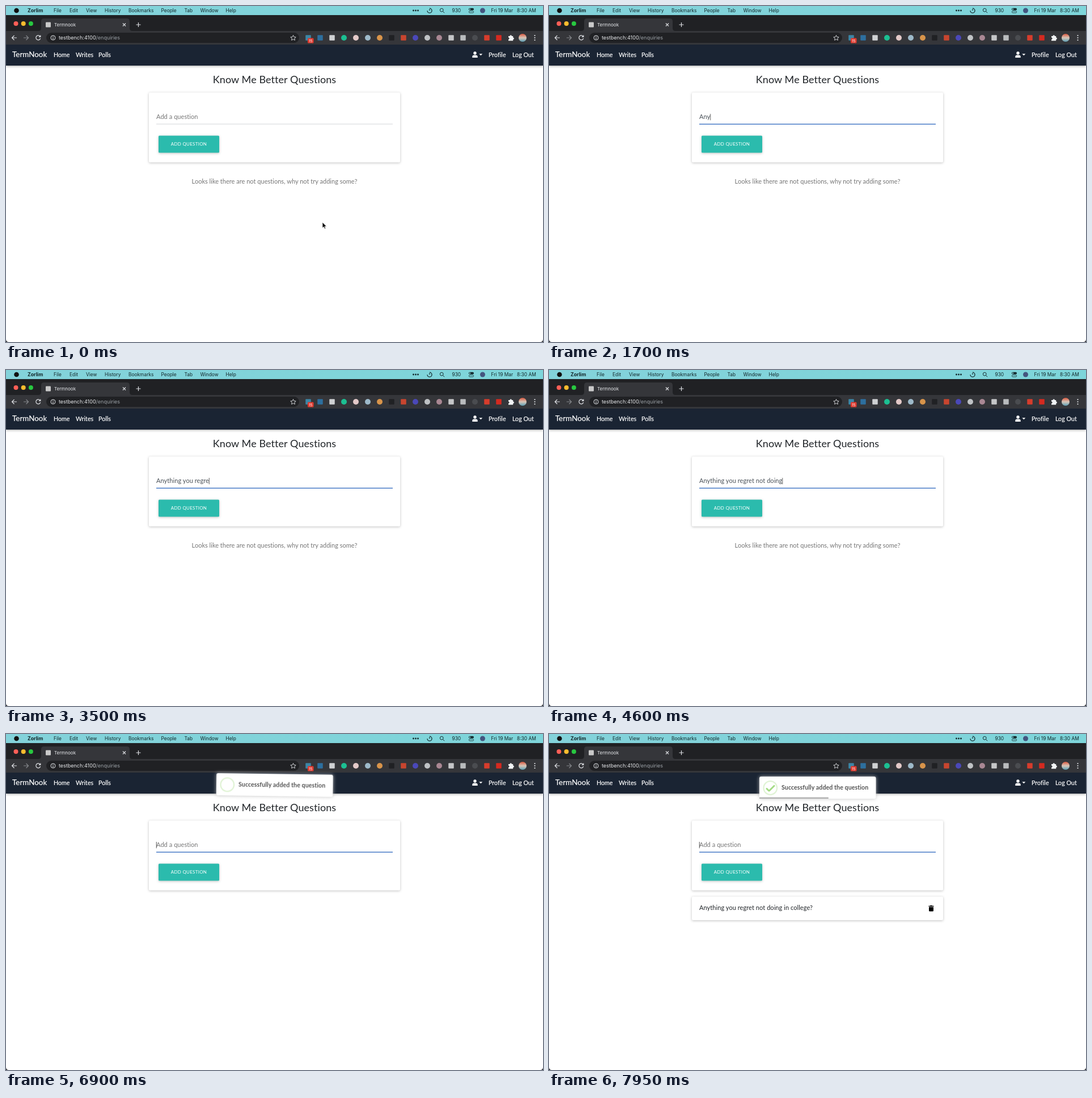
Write an HTML page that moves like this. It is 947 px wide and 592 px high and loops after 8 s.

```html
<!DOCTYPE html>
<html lang="en">
<head>
<meta charset="utf-8">
<title>Question form</title>
<style>
  html, body { margin: 0; height: 100%; overflow: hidden; background: #1c1d20; }
  svg { display: block; width: 100vw; height: 100vh; }
  text { font: 11px Lato, "Open Sans", sans-serif; letter-spacing: .065px; white-space: pre; }
  .ui { font: 8.4px Inter, Roboto, sans-serif; letter-spacing: 0; }
  .nav { font-size: 10.6px; fill: #fff; stroke: #fff; stroke-width: .2; }
  .hint { fill: #757575; }
  .mid { text-anchor: middle; }
  .card { filter: drop-shadow(0 1.3px 2px rgba(0,0,0,.25)); }
  .line { fill: none; stroke: #dfe1e5; stroke-width: 1.2; }
  #toast { transform-origin: 473.5px 94.5px; }
  #item { transform-origin: 473.5px 286px; }
  #bar { transform-origin: 371px 113px; }
  #toast, #item, #typed, #caret, #focus, #ibeam, #spark { opacity: 0; }
</style>
</head>
<body>
<svg viewBox="0 0 947 592" preserveAspectRatio="none">
  <defs>
    <linearGradient id="sky"><stop stop-color="#83d2da"/><stop offset="1" stop-color="#7ed5da"/></linearGradient>
    <linearGradient id="face" x2="0" y2="1"><stop stop-color="#d9583f"/><stop offset=".5" stop-color="#d8c6b8"/><stop offset="1" stop-color="#5b9fb5"/></linearGradient>
    <g id="bin"><path d="M-4.6-4.2h2.4l.7-.9h3l.7.9h2.4v1.3h-9.2zM-4-2.2h8v6.400q0 1.300-1.300 1.300h-5.400q-1.300 0-1.300-1.300z"/></g>
  </defs>

  <!-- page -->
  <path d="M0 68h947v519q0 5-5 5H5q-5 0-5-5z" fill="#fff"/>
  <rect y="68" width="947" height="37" fill="#1a2433" style="filter:drop-shadow(0 1.300px 2px rgba(0,0,0,.35))"/>
  <text class="nav" x="11" y="90.300" style="font-size:13.300px">TermNook</text>
  <g id="links"></g>
  <g fill="#fff"><circle cx="827" cy="83" r="2.700"/><path d="M822.300 91v-1.500q0-3 3-3h3.400q3 0 3 3v1.500zM834.300 84.300h6l-3 3z"/></g>

  <text class="mid" x="473.500" y="136" fill="#212529" style="font-size:18px;letter-spacing:.08px">Know Me Better Questions</text>
  <rect class="card" x="252" y="152.500" width="443" height="123" rx="2" fill="#fff"/>
  <text id="empty" class="hint mid" x="473.500" y="312.800" style="letter-spacing:.02px">Looks like there are not questions, why not try adding some?</text>

  <!-- input -->
  <rect x="265" y="207.500" width="417" height="1" fill="#d3d6da"/>
  <rect id="focus" x="265" y="207.500" width="417" height="1.500" fill="#4f80cc"/>
  <text id="prompt" class="hint" x="265" y="198.700">Add a question</text>
  <g id="typed">
    <text id="entry" x="265" y="198.700" fill="#495057">Anything you regret not doing in college?</text>
    <rect id="cover" x="265" y="188" width="225" height="16" fill="#fff"/>
  </g>
  <g id="caret"><rect x="264.800" y="190" width=".9" height="11.300" fill="#444"/></g>
  <rect class="card" x="269" y="228.500" width="107" height="30" rx="1.500" fill="#2bbbad"/>
  <text class="mid" x="322.500" y="245.500" fill="#fff" style="font-size:8px;letter-spacing:.25px">ADD QUESTION</text>

  <g id="item">
    <rect class="card" x="252" y="286.500" width="443" height="41.500" rx="2" fill="#fff"/>
    <text x="265" y="310.200" fill="#212529">Anything you regret not doing in college?</text>
    <use href="#bin" x="674" y="307"/>
  </g>

  <!-- browser frame -->
  <rect width="947" height="16" fill="url(#sky)"/>
  <path d="M0 68V21q0-5 5-5h937q5 0 5 5v47z" fill="#202124"/>
  <path d="M0 44h57q5 0 5-5V27q0-5 5-5h146q5 0 5 5v12q0 5 5 5h724v24H0z" fill="#35363a"/>
  <rect x="71" y="47" width="446" height="18" rx="9" fill="#202124"/>
  <g id="marks"></g>
  <text class="ui" x="85" y="35.700" fill="#e8eaed" style="font-size:8px">Termnook</text>
  <path class="line" d="M206 30.500l5 5m0-5l-5 5M229.500 33h8m-4-4v8"/>
  <path class="line" d="M19 56h-8.500m4-4l-4 4 4 4"/>
  <path class="line" d="M31 56h8.500m-4-4l4 4-4 4" style="stroke:#85878b"/>
  <path class="line" d="M60.300 53.800A4 4 0 1 0 60.700 57M60.800 51.500v2.800h-2.800"/>
  <circle class="line" cx="83" cy="56" r="4" style="stroke-width:1"/>
  <path class="line" d="M83 55.500v3m0-5v1"/>
  <text class="ui" x="93" y="59.200" fill="#9aa0a6" style="font-size:9px"><tspan fill="#e8eaed">testbench:4100</tspan>/enquiries</text>
  <path class="line" d="M506.500 51.500l1.400 3 3.300.4-2.400 2.200.6 3.200-2.900-1.600-2.900 1.600.6-3.200-2.400-2.200 3.300-.4z" style="stroke-width:.9"/>
  <rect x="532" y="56.500" width="10.500" height="9" rx="1.500" fill="#df3b30"/>
  <text class="ui mid" x="537.200" y="63.600" fill="#fff" style="font-size:6.500px">15</text>
  <path d="M886 53h2.500a1.700 1.700 0 1 1 3.400 0h2.300v2.600a1.700 1.700 0 1 1 0 3.400v2.300h-8.200v-2.500a1.600 1.600 0 1 0 0-3.200z" fill="#f1f3f4"/>
  <circle cx="911" cy="56" r="7" fill="url(#face)"/>

  <!-- menu bar -->
  <g id="menu" fill="#12272a"></g>
  <path d="M747 4.200a4 4 0 1 1-4 4M747 8V5.500" fill="none" stroke="#12272a" stroke-width="1.300"/>
  <g fill="none" stroke="#12272a"><circle cx="768.300" cy="7.200" r="2.900"/><path d="M770.500 9.500l2.700 2.700"/></g>
  <g fill="#12272a"><rect x="816" y="3.800" width="9" height="3.700" rx="1.800"/><rect x="816.400" y="8.900" width="8.200" height="3.100" rx="1.500" fill="none" stroke="#12272a" stroke-width=".8"/></g>
  <circle cx="818" cy="5.650" r="1.100" fill="#80d3da"/>

  <!-- toast -->
  <g id="toast">
    <rect x="371" y="75" width="205.500" height="39" rx="3" fill="#fff" style="filter:drop-shadow(0 0 3.300px rgba(190,190,190,.9))"/>
    <circle cx="390.300" cy="95" r="11.800" fill="none" stroke="#a5dc86" stroke-opacity=".35" stroke-width="2.300"/>
    <path id="spark" d="M401.700 99.500a12 12 0 0 1-5 6" fill="none" stroke="#a5dc86" stroke-width="2.600"/>
    <g fill="#a5dc86">
      <g transform="translate(383 95.300) rotate(45)"><rect id="tip" y="-1.500" height="3" rx="1.300"/></g>
      <g transform="translate(387.500 100.900) rotate(-45)"><rect id="stroke" y="-1.500" height="3" rx="1.300"/></g>
    </g>
    <text x="410" y="97.800" fill="#545454" style="font-size:10.670px;font-weight:700">Successfully added the question</text>
    <rect id="bar" x="371" y="111.500" width="205.500" height="2.500" fill="#b3b3b3"/>
  </g>

  <g id="pointer">
    <path id="arrow" d="M0 0v10.200l2.400-2.200 1.600 3.600 1.700-.8-1.600-3.400h3.200z" fill="#111" stroke="#fff" stroke-width=".7"/>
    <path id="ibeam" d="M-2-5.500q2 0 2 1.500v8q0 1.500-2 1.500M2-5.500q-2 0-2 1.500m0 8q0 1.500 2 1.500" fill="none" stroke="#333" stroke-width=".9"/>
  </g>
</svg>
<script>
  const LOOP = 8000;
  const $ = id => document.getElementById(id);

  function add(parent, tag, attrs, text = '') {
    const el = document.createElementNS('http://www.w3.org/2000/svg', tag);
    for (const k in attrs) el.setAttribute(k, attrs[k]);
    el.textContent = text;
    $(parent).append(el);
  }
  const dot = (parent, cx, cy, r, fill) => add(parent, 'circle', { cx, cy, r, fill });
  const box = (x, y, size, fill) =>
    add('marks', 'rect', { x: x - size / 2, y: y - size / 2, width: size, height: size, rx: 1, fill });

  // Menu bar
  dot('menu', 18.5, 8, 4.3, '#111');
  add('menu', 'text', { class: 'ui', x: 38, y: 11, style: 'font-weight:700;font-size:8.700px' }, 'Zorlim');
  [[84, 'File'], [112, 'Edit'], [141, 'View'], [174, 'History'], [216, 'Bookmarks'], [273.5, 'People'],
   [314.500, 'Tab'], [342.500, 'Window'], [387.500, 'Help'], [786.500, '930'], [855.500, 'Fri 19 Mar'], [901, '8:30 AM']]
    .forEach(([x, label]) => add('menu', 'text', { class: 'ui', x, y: 11 }, label));
  [718.5, 722.500, 726.500].forEach(x => dot('menu', x, 8, 1.4, '#12272a'));
  dot('menu', 840.500, 8, 4.5, '#44557f');

  // Window buttons, tab mark and toolbar
  ['#ff5f57', '#febc2e', '#28c840'].forEach((c, i) => dot('marks', 17.5 + 13.2 * i, 31, 4, c));
  box(74.5, 33, 9, '#c9c9c9');
  [['s', '#3c86a6'], ['s', '#2d6f9f'], ['s', '#cfd1d3'], ['c', '#1cbf92'], ['c', '#e3c9c8'], ['c', '#9db9c9'],
   ['c', '#d8944a'], ['s', '#202124'], ['s', '#c8452f'], ['c', '#4a48b8'], ['c', '#bfc2c5'], ['c', '#a98793'],
   ['s', '#c5c6c8'], ['s', '#b9bbbd'], ['c', '#4a4c50'], ['s', '#d63d2c'], ['s', '#d52a20']]
    .forEach(([kind, color], i) => {
      const x = 533 + 21 * i;
      kind === 's' ? box(x, 56, 9.5, color) : dot('marks', x, 56, 5, color);
    });
  [52, 56, 60].forEach(y => dot('marks', 932.500, y, 1.1, '#e8eaed'));

  [[84, 'Home'], [123, 'Writes'], [163, 'Polls'], [851, 'Profile'], [893, 'Log Out']]
    .forEach(([x, label]) => add('links', 'text', { class: 'nav', x, y: 89.900 }, label));

  // Plays [time, properties] rows on the shared loop.
  function play(id, rows, easing = 'linear') {
    const first = rows[0], last = rows[rows.length - 1];
    const all = [[0, first[1]], ...rows.filter(r => r[0] > 0), [LOOP, last[1]]];
    $(id).animate(all.map(([t, props]) => ({ offset: t / LOOP, easing, ...props })),
      { duration: LOOP, iterations: Infinity });
  }
  const show = (id, ...rows) => play(id, rows.map(([t, opacity]) => [t, { opacity }]), 'step-end');
  const at = (x, y) => ({ transform: `translate(${x}px, ${y}px)` });

  // Pointer
  play('pointer', [[0, at(558, 381)], [50, at(558, 381)], [150, at(550, 343)],
    [300, { ...at(550, 343), easing: 'ease-in-out' }], [1050, at(352, 196)]]);
  show('arrow', [0, 1], [900, 0]);
  show('ibeam', [0, 0], [900, 1], [1400, 0]);

  // Typing
  const SENT = 6900;
  const keys = [[1150, 0], [1400, 1], [1700, 3], [1850, 4], [1950, 5], [2050, 6], [2150, 7], [2250, 8],
    [2450, 9], [2550, 10], [2700, 11], [2850, 12], [2950, 13], [3050, 14], [3100, 15], [3250, 16], [3350, 17],
    [3500, 18], [3600, 19], [3700, 20], [3800, 21], [3850, 22], [3950, 23], [4000, 24], [4200, 25], [4300, 26],
    [4400, 27], [4450, 28], [4550, 29], [4650, 30], [4750, 31], [4900, 33], [4950, 35], [5150, 36], [5200, 37],
    [5300, 38], [5350, 39], [5550, 40], [5850, 41], [SENT, 0]];
  const steps = keys.map(([t, n]) => [t, at(n ? $('entry').getSubStringLength(0, n) : 0, 0)]);
  play('cover', steps, 'step-end');
  play('caret', steps, 'step-end');
  show('caret', [0, 0], [1150, 1], [6350, 0], [6850, 1], [7400, 0], [7900, 1]);
  show('typed', [0, 0], [1400, 1], [SENT, 0]);
  show('prompt', [0, 1], [1400, 0], [SENT, 1]);
  show('empty', [0, 1], [SENT, 0]);
  play('focus', [[0, { opacity: 0 }], [1150, { opacity: 0 }], [1350, { opacity: 1 }]]);

  // New list entry
  show('item', [0, 0], [6930, 1]);
  play('item', [[0, { transform: 'scaleY(0)' }], [6930, { transform: 'scaleY(0)', easing: 'ease-in-out' }],
    [7280, { transform: 'scaleY(1)' }]]);

  // Toast
  const POP = 6867;
  const tilt = (y, deg) => ({ transform: `translateY(${y}px) rotate(${deg}deg)` });
  const span = (x, width) => ({ x: x + 'px', width: width + 'px' });
  show('toast', [0, 0], [POP, 1]);
  play('toast', [[POP, tilt(-6.67, 2)], [POP + 165, tilt(0, -2)], [POP + 330, tilt(3.33, 2)], [POP + 500, tilt(0, 0)]], 'ease');
  show('spark', [0, 0], [7120, 1], [7290, 0]);
  play('tip', [[POP + 405, span(-3, 0)], [POP + 525, span(-5, 17)], [POP + 630, span(3, 5)], [POP + 750, span(0, 8)]], 'ease');
  play('stroke', [[POP + 488, span(0, 0)], [POP + 630, span(0, 12)], [POP + 750, span(0, 15)]], 'ease');
  show('bar', [0, 0], [6933, 1]);
  play('bar', [[6933, { transform: 'scaleX(1)' }], [LOOP - 1, { transform: 'scaleX(.5736)' }]]);
</script>
</body>
</html>
```
